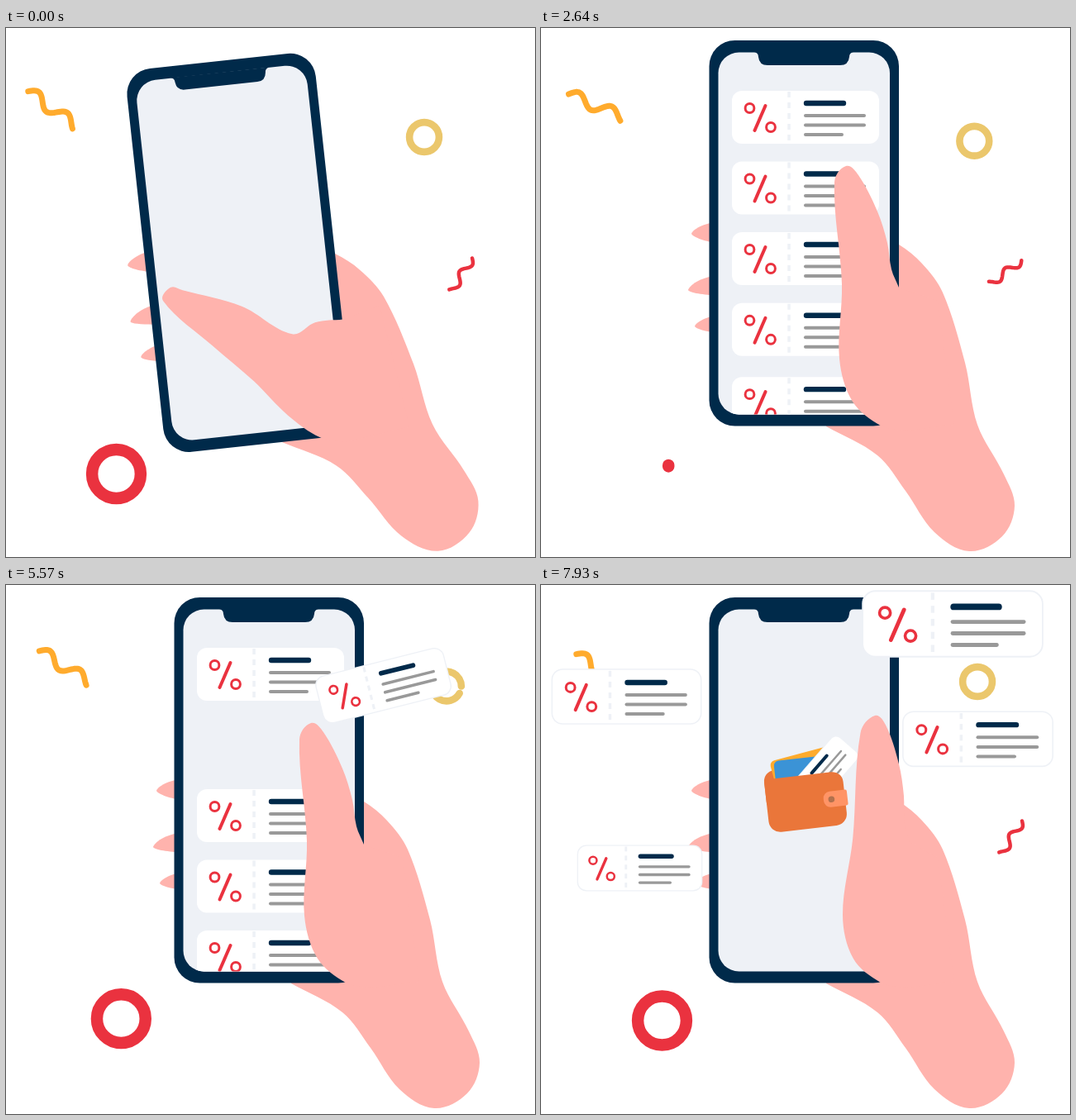
Write an HTML page with a canvas that moves like this. It is 640 px wide and 640 px high and loops after 8 s.

```html
<!DOCTYPE html>
<html lang="en">
<head>
<meta charset="utf-8">
<title>Coupons to wallet</title>
<style>
html, body { margin: 0; width: 100%; height: 100%; overflow: hidden; background: #fff; }
canvas { display: block; width: 100vw; height: 100vh; }
</style>
</head>
<body>
<canvas id="stage" width="640" height="640"></canvas>
<script>
const ctx = document.getElementById('stage').getContext('2d');
const LOOP = 8000;
const RAD = Math.PI / 180;
const NAVY = '#002a4a', SCREEN = '#eef1f6', SKIN = '#ffb3ad', RED = '#ea323f';
const AMBER = '#ffab2d', GOLD = '#ebc76c', GREY = '#999', ORANGE = '#ea763a';

// Timing helpers
const clamp = v => Math.min(1, Math.max(0, v));
const span = (t, a, b) => clamp((t - a) / (b - a));
const smooth = p => p * p * (3 - 2 * p);
const ease = (t, a, b) => smooth(span(t, a, b));
const outCubic = p => 1 - (1 - p) ** 3;
const inOutCubic = p => p < .5 ? 4 * p ** 3 : 1 - 4 * (1 - p) ** 3;
const mix = (a, b, p) => a + (b - a) * p;

// Eases between poses given as [time, value, ...]
function drift(t, ...poses) {
  const i = Math.max(1, poses.findIndex(p => p[0] > t));
  const a = poses[i - 1], b = poses[i], p = ease(t, a[0], b[0]);
  return a.slice(1).map((v, k) => mix(v, b[k + 1], p));
}

// Drawing helpers
function at(x, y, deg, scale, draw) {
  ctx.save();
  ctx.translate(x, y);
  ctx.rotate(deg * RAD);
  ctx.scale(scale, scale);
  draw();
  ctx.restore();
}
function box(x, y, w, h, r, color) {
  ctx.beginPath();
  ctx.roundRect(x, y, w, h, r);
  ctx.fillStyle = color;
  ctx.fill();
}
function pen(width, color) {
  ctx.lineWidth = width;
  ctx.strokeStyle = color;
  ctx.lineCap = ctx.lineJoin = 'round';
  ctx.stroke();
}
function line(x1, y1, x2, y2, width, color) {
  ctx.beginPath();
  ctx.moveTo(x1, y1);
  ctx.lineTo(x2, y2);
  pen(width, color);
}
function arc(x, y, r, from, to, width, color) {
  if (to - from < .5) return;
  ctx.beginPath();
  ctx.arc(x, y, r, from * RAD, to * RAD);
  pen(width, color);
}
function fillPath(d, color) {
  ctx.fillStyle = color;
  ctx.fill(new Path2D(d));
}

// Smooth path through points; handles are a third of each segment
function spline(pts) {
  const handle = (i, j) => {
    const [ax, ay] = pts[Math.max(0, i - 1)], [bx, by] = pts[Math.min(pts.length - 1, i + 1)];
    const [x, y] = pts[i], [ox, oy] = pts[j];
    const k = (j - i) * Math.hypot(ox - x, oy - y) / 3 / Math.hypot(bx - ax, by - ay);
    return [x + (bx - ax) * k, y + (by - ay) * k];
  };
  let d = 'M' + pts[0];
  for (let i = 1; i < pts.length; i++) d += `C${handle(i - 1, i)},${handle(i, i - 1)},${pts[i]}`;
  return d;
}

// Confetti: each piece wipes away from its start, then comes back
function squiggle([x, y, deg], scale, width, hidden, color) {
  if (hidden > .995) return;
  at(x, y, deg, scale, () => {
    ctx.beginPath();
    for (let i = 0; i <= 50; i++) {
      const px = mix(mix(-35, 35, hidden), 35, i / 50);
      ctx.lineTo(px, -1 - 7 * Math.sin((px + 35) / 43 * 2 * Math.PI));
    }
    pen(width / scale, color);
  });
}
function ring(t, [x, y], r, width, color, start, empty, full) {
  if (t < empty) arc(x, y, r, 360 * ease(t, start, empty), 360, width, color);
  else arc(x, y, r, 0, 360 * ease(t, empty, full), width, color);
}
function confetti(t) {
  const amber = drift(t, [0, 54.5, 98, 36], [3700, 68, 94, 20], [6500, 70, 101, 36], [LOOP, 70.5, 105, 36]);
  squiggle(amber, 1, 7, ease(t, 0, 1250) - ease(t, 1500, 2600), AMBER);

  const red = drift(t, [0, 551, 298, 122], [3700, 565, 294, 148], [6800, 568, 304, 122], [LOOP, 569, 305, 122]);
  squiggle(red, .67, 4.5, ease(t, 4300, 5500) - ease(t, 5750, 6600), RED);

  const gold = drift(t, [0, 506, 132], [4000, 531, 138.5], [6600, 534, 114], [LOOP, 528, 117]);
  ring(t, gold, 17.9, 8.6, GOLD, 5450, 6150, 7400);

  const big = drift(t, [0, 133.5, 539.5], [3900, 122, 527.5], [6500, 146.5, 523.5], [LOOP, 146.5, 527]);
  ring(t, big, 29.4, 14.5, RED, 1600, 2700, 4250);
}

// Coupon, drawn around its centre
function coupon(x, y, deg, scale) {
  at(x, y, deg, scale, () => {
    box(-90.5, -33.5, 181, 67, 13.5, SCREEN);
    box(-89, -32, 178, 64, 12, '#fff');
    for (let dash = -31; dash < 30; dash += 13) box(-21.7, dash, 3.5, 7, 0, SCREEN);
    arc(-67.5, -11, 5.4, 0, 360, 3, RED);
    arc(-42, 12, 5.4, 0, 360, 3, RED);
    line(-48.5, -14, -61.5, 16, 4, RED);
    line(1, -17, 46, -17, 6.4, NAVY);
    for (let i = 0; i < 3; i++) line(0, -2 + 11.5 * i, i < 2 ? 71 : 44, -2 + 11.5 * i, 4, GREY);
  });
}

// The second coupon leaves early for the wallet, the rest follow one by one
const rowY = i => 108 + 85.5 * i;
const lift = i => i === 1 ? 5100 : 5650 + 50 * i;

function listCoupons(t) {
  for (let i = 0; i < 5; i++) {
    if (t >= lift(i)) continue;
    const s = t - 180 * i;
    const glide = (Math.max(0, 2160 - s) / 117) ** 2;
    const entry = 80 * (Math.max(0, 600 - s) / 600) ** 2;
    coupon(320, rowY(i) + glide + entry, 0, 1);
  }
}
function flyOut(t, i, x, y, scale) {
  if (t < lift(i)) return;
  const p = span(t, lift(i), 7500), u = outCubic(p);
  coupon(mix(320, x, u), mix(rowY(i), y, u), 0, mix(1, scale, p));
}
function flyingCoupons(t) {
  flyOut(t, 0, 103.5, 135, 1.005);
  flyOut(t, 3, 119.5, 342.5, .838);
  if (t >= lift(4)) {
    const up = inOutCubic(span(t, lift(4), 6400));
    coupon(mix(320, 528.5, ease(t, 5750, 7080)), mix(rowY(4), 186.3, up), 0, 1.01);
  }
  flyOut(t, 2, 498, 47, 1.213);
}
function savedCoupon(t) {
  if (t < lift(1)) return;
  const out = ease(t, lift(1), 5700), back = ease(t, 5750, 7100);
  coupon(mix(mix(320, 475, out), 335, back), mix(mix(rowY(1), 112, out), 235, back ** 1.7),
    mix(-16 * out, -49, back), mix(mix(1, .87, out), .62, back));
}

// Wallet, drawn around its centre
function wallet(t, draw) {
  const pop = outCubic(span(t, 5950, 6350));
  if (!pop) return;
  const rise = ease(t, 6430, 7300);
  at(320 + rise, 318 - 56 * rise, -6.5 * ease(t, 6900, 7900), pop, draw);
}
function walletBack() {
  box(-48, -42, 60, 50, 13, ORANGE);
  at(-39, -53, -8.5, 1, () => box(0, 0, 75, 40, 6, AMBER));
  box(-34, -53, 75, 45, 6, '#3b93d6');
}
function walletFront() {
  box(-48, -32, 95, 65, [4, 13, 14, 14], ORANGE);
  box(21, -9, 29, 19, [8, 2, 2, 8], '#ff9466');
  box(26.7, -3.1, 7.6, 7.6, 3.8, '#b2714d');
}

// Thumb outline from the heel of the hand round the tip to the wrist side
const LOW = [[420, 490], [391, 481], [355, 450], [319, 405], [274, 357], [220, 296],
  [231, 281], [245, 286], [314, 313], [371, 353], [400, 342], [434, 342]];
const HIGH = [[440, 488], [411, 481], [377, 452], [361, 400], [364, 310], [355, 187],
  [369, 167], [384, 178], [407, 222], [419, 260], [424, 292], [433, 314]];

function thumb(t) {
  const rise = ease(t, 0, 900), lean = ease(t, 5700, 6250);
  const pts = LOW.map(([x, y], i) => {
    const px = mix(x, HIGH[i][0], rise), py = mix(y, HIGH[i][1], rise);
    const bend = lean * (Math.max(0, 481 - py) / 314) ** 1.6;
    return [px + 35 * bend, py - 9 * bend];
  });
  fillPath(spline(pts) + 'L480,330 500,480Z', SKIN);
}
function finger(x, y, up, down) {
  fillPath(`M212,${y - up}C${x + 15},${y - up + 1} ${x + 1},${y - 5} ${x},${y}` +
    `C${x + 1},${y + 3} ${x + 14},${y + down - 2} 212,${y + down}Z`, SKIN);
}
function handBack() {
  fillPath(spline([[405, 250], [433, 262], [461, 285], [486, 320], [513, 405], [528, 480],
    [560, 540], [573, 578], [558, 615], [518, 633], [476, 610], [441, 560], [407, 517],
    [345, 482]]) + 'Z', SKIN);
  finger(182, 249, 14, 11);
  finger(178, 317, 17, 7);
  finger(186, 361, 13, 8);
}
function phone(t) {
  box(203.5, 15, 229.5, 466.5, 31, NAVY);
  ctx.save();
  box(214.5, 29.5, 207.5, 438, 25, SCREEN);
  ctx.clip();
  listCoupons(t);
  ctx.restore();
  fillPath('M258,29Q263,30 263,35Q264,45 274,45H362Q372,45 373,35Q373,30 378,29Z', NAVY);
}

function frame(t) {
  ctx.fillStyle = '#fff';
  ctx.fillRect(0, 0, 640, 640);
  confetti(t);

  // Hand and phone swing about the wrist
  const swing = -6.2 * (1 - inOutCubic(span(t, 0, 900)));
  const swung = draw => at(518, 590, swing, 1, () => {
    ctx.translate(-518, -590);
    draw();
  });
  swung(() => { handBack(); phone(t); });
  wallet(t, walletBack);
  savedCoupon(t);
  wallet(t, walletFront);
  flyingCoupons(t);
  swung(() => thumb(t));
}

const begin = performance.now();
function tick() {
  frame((performance.now() - begin) % LOOP);
  requestAnimationFrame(tick);
}
tick();
</script>
</body>
</html>
```
